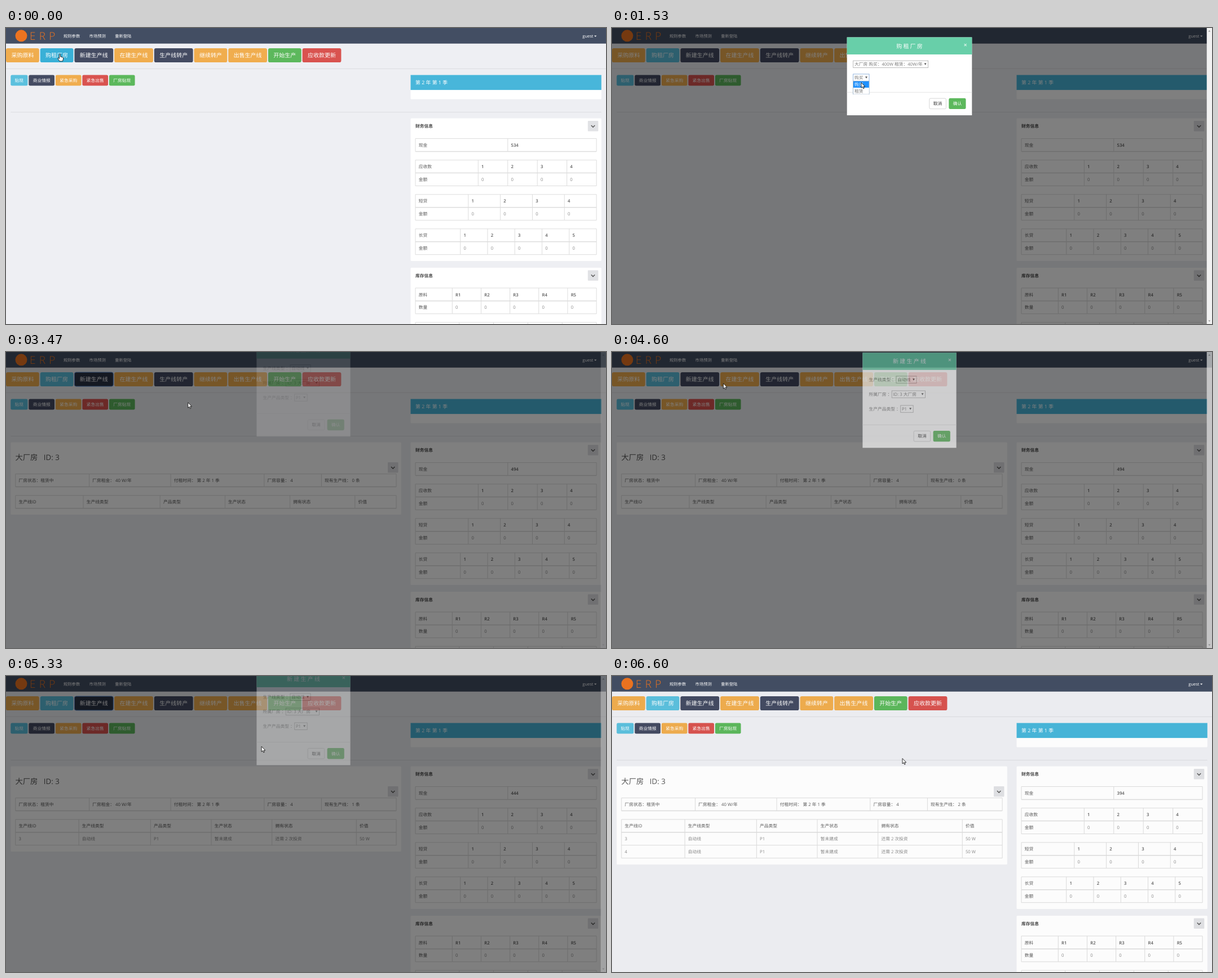
These frames come from a looping animation (1064 by 526 pixels, 7340 ms). An HTML page:

```html
<!DOCTYPE html>
<html lang="zh-CN">
<head>
<meta charset="utf-8">
<title>ERP</title>
<style>
  html, body { margin: 0; width: 100%; height: 100%; overflow: hidden; background: #eeeff3; }
  svg { display: block; width: 1064px; height: 526px; }
  text {
    font-family: "Open Sans", "Noto Sans CJK SC", "Noto Sans CJK", sans-serif;
    text-rendering: geometricPrecision;
    white-space: pre;
  }
</style>
</head>
<body>
<svg viewBox="0 0 1064 526">
  <g id="page"></g>
  <rect id="backdrop" width="1064" height="526"/>
  <g id="modal">
    <g id="dialog"></g>
    <rect x="1054.7" width="9.3" height="526" fill="#f1f1f1"/>
    <path d="M1057.3 6.5h4l-2-2.6zM1057.3 519.5h4l-2 2.6z" fill="#999"/>
  </g>
  <g id="cursor" stroke="#000" stroke-width=".8" fill="#fff" stroke-linejoin="round">
    <path id="arrow" d="M0 0V9.4L2.2 7.4 3.7 10.8 5.2 10.1 3.8 6.9H6.7Z"/>
    <path id="hand" d="M-1 .9Q0 -.6 1 .9V5L5 6Q6.5 6.5 6 9L5 13H-.5L-3.5 8.5Q-3.5 7 -2 7.4L-1 8.4Z"/>
  </g>
</svg>
<script>
const LOOP = 7340;
const EM = 7.76;
const ROW = 22.9, GAP = 15.3;
const ORANGE = '#f0ad4e', BLUE = '#5bc0de', DARK = '#444b62', GREEN = '#5cb85c', RED = '#d9534f';
const $ = id => document.getElementById(id);
const clamp = v => Math.max(0, Math.min(1, v));
const easeOut = (v, power) => 1 - (1 - clamp(v)) ** power;

// ---------- drawing helpers: each returns SVG markup ----------
const rect = (x, y, w, h, fill, more = '') =>
  `<rect x="${x}" y="${y}" width="${w}" height="${h}" fill="${fill}" ${more}/>`;

const line = (x1, y1, x2, y2, color = '#ddd', width = 1) =>
  `<path d="M${x1} ${y1}L${x2} ${y2}" stroke="${color}" stroke-width="${width}"/>`;

// cy is the vertical middle of the line of text
const text = (x, cy, s, size = EM, fill = '#555', more = '') =>
  `<text x="${x}" y="${cy + size * .37}" font-size="${size}" fill="${fill}" ${more}>${s}</text>`;

const middle = 'text-anchor="middle"';
const isWide = c => c > '\u2e7f';

// estimated width in em
const measure = s => [...String(s)].reduce((w, c) => w + (isWide(c) ? 1 : c === ' ' ? .26 : .62), 0);

const button = (x, y, w, h, label, fill, size, more = '') =>
  rect(x, y, w, h, fill, `rx="${h / 8}" ${more}`) +
  text(x + w / 2, y + h / 2, label, size, '#fff', middle);

const chevron = (x, y) =>
  rect(x, y, 18.5, 18.5, '#e1e2e5', 'rx="1"') +
  `<path d="M${x + 6} ${y + 8}l3.2 3.2 3.2-3.2" fill="none" stroke="#555" stroke-width="1.5"/>`;

function select(x, cy, label, border = '#a9a9a9') {
  const w = measure(label) * EM + 12.8;
  return rect(x, cy - 6.2, w, 12.4, '#fff', `stroke="${border}" stroke-width=".8"`) +
    text(x + 2.2, cy, label, EM, '#777') +
    `<path d="M${x + w - 7} ${cy - 1.8}h4l-2 3.4z" fill="#555"/>`;
}

// columns share the width in proportion to their widest cell plus padding
function columnEdges(left, right, rows) {
  const widths = rows[0].map((_, c) => 1.5 + Math.max(...rows.map(row => measure(row[c]))));
  const scale = (right - left) / widths.reduce((a, b) => a + b);
  return widths.reduce((edges, w) => [...edges, edges[edges.length - 1] + w * scale], [left]);
}

function table(left, right, y, rows, labelled) {
  const edges = columnEdges(left, right, rows);
  let out = line(left, y, right, y);
  for (const x of edges) out += line(x, y, x, y + rows.length * ROW);
  rows.forEach((row, r) => {
    const top = y + r * ROW;
    out += line(left, top + ROW, right, top + ROW, '#ddd', r ? 1 : 1.5);
    row.forEach((cell, c) => {
      const strong = !r || (labelled && !c);
      const weight = !strong ? 400 : isWide(String(cell)[0]) ? 500 : 600;
      out += text(edges[c] + 5.7, top + ROW / 2 + .2, cell, EM, strong ? '#5a5a5a' : '#888', `font-weight="${weight}"`);
    });
  });
  return out;
}

// white panel with tables stacked below its heading
function panel(left, right, top, headingHeight, tables, labelled) {
  let y = top + headingHeight, body = '';
  for (const rows of tables) {
    body += table(left + 8.5, right - 8.7, y, rows, labelled);
    y += rows.length * ROW + GAP;
  }
  return rect(left, top, right - left, y - 4 - top, '#fff', 'rx="1.5"') + body;
}

// ---------- page ----------
const bigButtons = [
  ['采购原料', ORANGE], ['购租厂房', BLUE], ['新建生产线', DARK], ['在建生产线', ORANGE],
  ['生产线转产', DARK], ['继续转产', ORANGE], ['出售生产线', ORANGE], ['开始生产', GREEN], ['应收款更新', RED]
];
const smallButtons = [
  ['贴现', BLUE], ['商业情报', DARK], ['紧急采购', ORANGE], ['紧急出售', RED], ['厂房贴现', GREEN]
];
const activeFill = { 购租厂房: '#39b0d7', 新建生产线: '#2b3245' };

function buttonRow(x, y, h, size, padding, items, active, focused) {
  return items.map(([label, fill]) => {
    const w = label.length * size + padding;
    const on = label === active;
    const ring = on && focused ? 'stroke="#5d8fd6"' : '';
    const markup = button(x, y, w, h, label, on ? activeFill[label] : fill, size, ring);
    x += w + 1.9;
    return markup;
  }).join('');
}

function navbar() {
  return rect(0, 0, 1064, 27.7, '#434e63') +
    '<circle cx="27" cy="13.8" r="10.5" fill="#ec7320"/>' +
    text(42, 14.2, 'ERP', 19, '#ec7320', 'font-weight="300" letter-spacing="6.2"') +
    ['规则参数', '市场预测', '重新登陆'].map((s, i) => text(102 + i * 45.6, 14, s, 7.3, '#fff')).join('') +
    text(1041.5, 14, 'guest', 7.5, '#fff', 'text-anchor="end"') +
    '<path d="M1043 13.5h4.4l-2.2 2.3z" fill="#fff"/>';
}

const numbered = (label, prefix, n) => [label, ...Array.from({ length: n }, (_, i) => prefix + (i + 1))];
const zeros = (label, n) => [label, ...Array(n).fill('0')];

function sidePanels(cash) {
  const left = 717.5, right = 1055.8;
  const sidePanel = (top, title, tables) =>
    panel(left, right, top, 36, tables, true) +
    text(left + 8.5, top + 13.8, title, EM, '#444', 'font-weight="600"') +
    chevron(right - 24, top + 4.5);
  const account = (label, n) => [numbered(label, '', n), zeros('金额', n)];
  return rect(left, 83.5, right - left, 43, '#fff', 'rx="1.5"') +
    rect(left, 83.5, right - left, 26.6, '#48b6da') +
    text(left + 8.5, 97, '第 2 年 第 1 季', 8.86, '#fff') +
    sidePanel(160.5, '财务信息', [
      [['现金', cash]], account('应收款', 4), account('短贷', 4), account('长贷', 5)
    ]) +
    sidePanel(426, '库存信息', [
      [numbered('原料', 'R', 5), zeros('数量', 5)], [numbered('产品', 'P', 4)]
    ]);
}

function factoryPanel(lineCount) {
  const status = [['厂房状态：租赁中', '厂房租金： 40 W/年', '付租时间： 第 2 年 1 季', '厂房容量： 4', `现有生产线： ${lineCount} 条`]];
  const lines = [['生产线ID', '生产线类型', '产品类型', '生产状态', '拥有状态', '价值']];
  for (let i = 0; i < lineCount; i++) lines.push([3 + i, '自动线', 'P1', '暂未建成', '还需 2 次投资', '50 W']);
  return panel(8.3, 700.8, 160.5, 56.2, [status, lines]) +
    text(16.5, 187.5, '大厂房   ID: 3', 13.3) + chevron(677, 196);
}

function pageMarkup(stage, active, focused) {
  return rect(0, 0, 1064, 526, '#eeeff3') + navbar() +
    buttonRow(0, 36, 25, 10, 18.8, bigButtons, active, focused) +
    line(0, 72.3, 1064, 72.3, '#dcdde1') +
    buttonRow(8.3, 83.5, 19, EM, 14.6, smallButtons) +
    line(8.3, 149.5, 1055.7, 149.5, '#dcdde1') +
    sidePanels([534, 494, 444, 394][stage]) +
    (stage ? factoryPanel(stage - 1) : '');
}

// ---------- dialogs ----------
const TOP = 16.5;
const factoryForm = {
  title: '购租厂房', width: 221.6, spacing: 23.8,
  fields: choice => [['', '大厂房 购买：400W 租赁：40W/年'], ['', choice, '#7aa3d6']]
};
const lineForm = {
  title: '新建生产线', width: 166.2, spacing: 26,
  fields: () => [['生产线类型 ：', '自动线'], ['所属厂房 ：', 'ID: 3 大厂房'], ['生产产品类型 ：', 'P1']]
};
const formHeight = form => 91 + form.spacing * form.fields().length;

function dropdown(x, y, highlight) {
  const w = 28.3, h = 11.4;
  return rect(x, y, w, 2 * h, '#fff', 'stroke="#7f9db9" stroke-width=".8"') +
    ['购买', '租赁'].map((s, i) =>
      rect(x + .3, y + i * h, w - .6, h, i === highlight ? '#1e90ff' : '#fff') +
      text(x + 2.2, y + (i + .5) * h, s, EM, i === highlight ? '#fff' : '#777')).join('');
}

function dialogMarkup(form, hot, choice, highlight) {
  const w = form.width, h = formHeight(form);
  const x = (1055 - w) / 2, right = x + w, by = TOP + h - 30;
  const fields = form.fields(choice).map(([label, value, border], i) => {
    const cy = TOP + 48 + i * form.spacing;
    return text(x + 11, cy, label, EM, '#777') + select(x + 11 + measure(label) * EM, cy - .2, value, border);
  }).join('');
  return rect(x, TOP, w, h, '#fff') +
    rect(x, TOP, w, 30.5, '#68cfa9') +
    text(x + w / 2 + 1.1, TOP + 15.5, form.title, 10, '#fff', middle + ' letter-spacing="2.2"') +
    text(right - 11.7, TOP + 13, '×', 11, '#d5f1e6', middle + ' font-weight="700"') +
    fields +
    line(x, by - 10.8, right, by - 10.8, '#e5e5e5') +
    rect(right - 75.5, by, 29.6, 18.6, '#fff', 'rx="2" stroke="#ccc" stroke-width=".8"') +
    text(right - 60.7, by + 9.3, '取消', EM, '#333', middle) +
    button(right - 41, by - .4, 30.2, 19.4, '确认', hot ? '#449d44' : GREEN, EM) +
    (highlight < 0 ? '' : dropdown(x + 11, TOP + 78.3, highlight));
}

// ---------- timeline ----------
const SHADE = 150, FADE = 200, SLIDE = 300, HIDE = 250;
const dialogs = [
  { click: 190, close: 2580, button: '购租厂房', form: factoryForm },
  { click: 3290, close: 4530, button: '新建生产线', form: lineForm },
  { click: 5110, close: 6205, button: '新建生产线', form: lineForm }
];

// pointer stops: x, y and the control found there
const stops = {
  buy: [95.5, 46, '购租厂房'], approach: [501, 93], choose: [442, 87],
  first: [442, 97], second: [441, 107], agree: [612, 131, '确认'],
  build: [165, 47, '新建生产线'], confirm: [585, 161, '确认'], rest: [515, 146.5]
};
const moves = [
  ['buy', -1, 0], ['approach', 300, 930], ['choose', 930, 1130], ['first', 1400, 1530],
  ['second', 1580, 1700], ['agree', 1780, 2150], ['build', 2480, 3110], ['confirm', 3325, 4330],
  ['build', 4400, 4750], ['confirm', 5110, 5800], ['rest', 6260, 6600]
];

function pointerAt(t) {
  const i = moves.findLastIndex(move => move[1] <= t);
  const [name, begin, end] = moves[i];
  const from = stops[moves[Math.max(0, i - 1)][0]], to = stops[name];
  const k = (t - begin) / (end - begin), s = easeOut(k, 3);
  return {
    x: from[0] + (to[0] - from[0]) * s,
    y: from[1] + (to[1] - from[1]) * s,
    over: k > .8 ? to[2] : undefined
  };
}

// rebuild a group only when its inputs change
const drawn = {};
function update(id, key, build) {
  if (drawn[id] === key) return;
  drawn[id] = key;
  $(id).innerHTML = build();
}

function drawDialog(t, d, over) {
  const open = d ? d.click + SHADE : 0;
  const visible = d && t >= open && t < d.close + HIDE;
  $('modal').style.display = visible ? '' : 'none';
  if (!visible) return;
  const closing = t >= d.close, age = t - (closing ? d.close : open);
  const moved = easeOut(age / SLIDE, 1.65), faded = clamp(age / FADE);
  const lift = (closing ? moved : 1 - moved) * formHeight(d.form) / 4;
  $('modal').setAttribute('opacity', closing ? 1 - faded : faded);
  $('dialog').setAttribute('transform', `translate(0 ${-lift})`);

  const hot = over === '确认';
  const choice = t < 1740 ? '购买' : '租赁';
  const highlight = t < 1270 || t >= 1740 ? -1 : +(t > 1640);
  update('dialog', [d.form.title, hot, choice, highlight].join(), () => dialogMarkup(d.form, hot, choice, highlight));
}

function draw(t) {
  const { x, y, over } = pointerAt(t);
  const stage = dialogs.filter(d => t >= d.close + 150).length;
  const d = dialogs.find(d => t >= d.click && t < d.close + HIDE + SHADE);
  const focused = !!d && t < d.click + SHADE + SLIDE;
  const active = focused ? d.button : over;
  update('page', [stage, active, focused].join(), () => pageMarkup(stage, active, focused));

  const shade = d ? clamp(Math.min((t - d.click) / SHADE, 1 - (t - d.close - HIDE) / SHADE)) : 0;
  $('backdrop').setAttribute('opacity', shade / 2);
  drawDialog(t, d, over);

  $('hand').style.display = over ? '' : 'none';
  $('arrow').style.display = over ? 'none' : '';
  $('cursor').setAttribute('transform', `translate(${x} ${y})`);
}

const start = performance.now();
function tick() {
  draw((performance.now() - start) % LOOP);
  requestAnimationFrame(tick);
}
tick();
</script>
</body>
</html>
```
